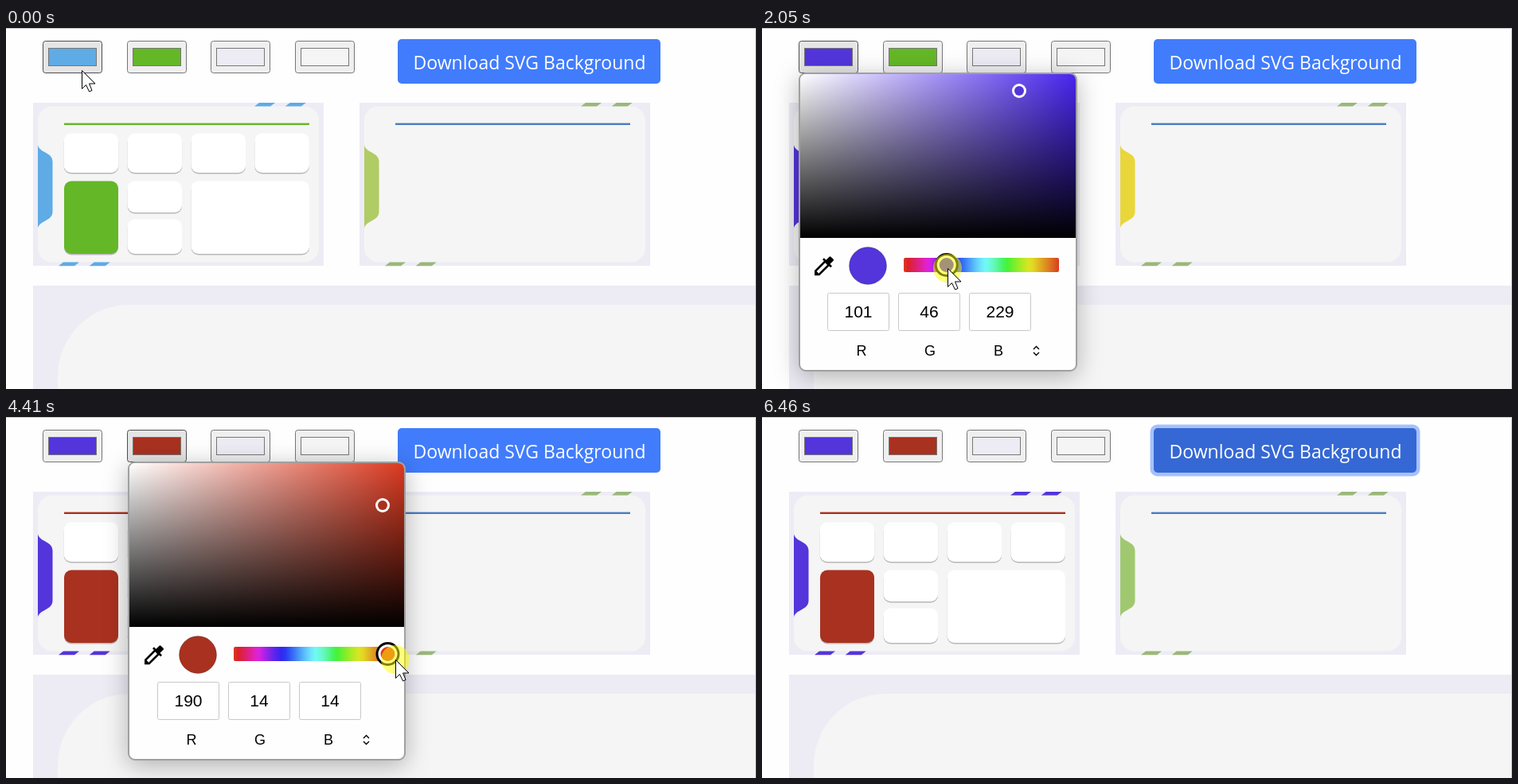
An HTML page for the animation above (6.7 s loop, 942 by 454 pixels).

```html
<!DOCTYPE html>
<html lang="en">
<head>
<meta charset="utf-8">
<style>
  html, body { margin: 0; width: 100%; height: 100%; overflow: hidden; background: #fefefe; }
  svg { display: block; }
  text { text-anchor: middle; font: 21px "Liberation Sans", Arial, sans-serif; }
  .button { font: 23px "Open Sans", "Noto Sans", sans-serif; fill: #fff; }
  .label { font-size: 18px; }
  .popup { filter: drop-shadow(0 6px 15px rgba(0, 0, 0, .28)); }
</style>
</head>
<body>
<svg width="942" height="454" viewBox="0 0 942 454">
  <defs>
    <linearGradient id="dark" x2="0" y2="1">
      <stop stop-opacity="0"/><stop offset="1"/>
    </linearGradient>
    <linearGradient id="hues"></linearGradient>
  </defs>
  <g id="scene"></g>
</svg>
<script>
const LOOP = 6700;
const LILAC = '#edecf5', PAPER = '#f5f5f5';

// A click holds the button from the end of its move, a drag from the start, both until the next move.
const moves = [
  { from: 90, to: 330, x: 107, y: 53, hold: 'click' },
  { from: 760, to: 800, x: 99, y: 106 },
  { from: 800, to: 1420, x: 263, y: 307 },
  { from: 1490, to: 1890, x: 233, y: 302, hold: 'drag' },
  { from: 2060, to: 2450, x: 200, y: 16 },
  { from: 2450, to: 2680, x: 178, y: 54, hold: 'click' },
  { from: 3125, to: 3790, x: 430, y: 291 },
  { from: 3870, to: 4400, x: 489, y: 305, hold: 'drag' },
  { from: 4560, to: 4860, x: 902, y: 174, hold: 'click' },
  { from: 5200, to: 5580, x: 700, y: 48 },
  { from: 5900, to: 6000, x: 700, y: 48, hold: 'drag' },
  { from: 6050, to: 6450, x: 858, y: 470 }
];
const pickers = [
  { dx: 0, open: 330, close: 2760, drag: 1490, end: 1890, hues: [200, 258], s: .799, v: .898, mark: [323, 79] },
  { dx: 107, open: 2920, close: 4860, drag: 3870, end: 4400, hues: [102, 0], s: .926, v: .745, mark: [365, 111] }
];

function ease(t, from, to) {
  const p = Math.min(1, Math.max(0, (t - from) / (to - from)));
  return p * p * (3 - 2 * p);
}
const mix = (a, b, p) => a + (b - a) * p;

const hsv = (h, s, v) => [5, 3, 1].map(n => {
  const k = (n + h / 60) % 6;
  return Math.round(255 * v * (1 - s * Math.max(0, Math.min(k, 4 - k, 1))));
});

// Screen profile: shifts each hue a little, pales the cyans and dims the reds.
function tone(h, s = 1, v = 1) {
  const a = h * Math.PI / 180;
  const sat = .85 - .3 * Math.exp(-(((h - 170) / 45) ** 2));
  return `rgb(${hsv(h + 8 * Math.cos(2 * a), sat * s, (.92 - .06 * Math.cos(a)) * v)})`;
}

function colour(p, t) {
  const hue = mix(...p.hues, ease(t, p.drag, p.end));
  return { hue, swatch: tone(hue, (1 + p.s) / 2, p.v + .025), field: tone(hue), rgb: hsv(hue, p.s, p.v) };
}

function tabColour(t) {
  const warm = .27 + .68 * ease(t, 300, 2500) - .85 * ease(t, 4950, 6460);
  return `rgb(${mix(150, 245, warm)},${mix(199, 216, warm)},${mix(118, 50, warm)})`;
}

document.getElementById('hues').innerHTML = Array.from({ length: 37 }, (_, i) =>
  `<stop offset="${i / 36}" stop-color="${tone(360 - i * 10)}"/>`).join('');

const rect = (x, y, w, h, fill, r = 0, more = '') =>
  `<rect x="${x}" y="${y}" width="${w}" height="${h}" rx="${r}" fill="${fill}" ${more}/>`;
const boxed = (x, y, w, h, fill, r, stroke) =>
  rect(x + .5, y + .5, w - 1, h - 1, fill, r, `stroke="${stroke}"`);
const disc = (x, y, r, fill, more = '') => `<circle cx="${x}" cy="${y}" r="${r}" fill="${fill}" ${more}/>`;
const path = (d, fill, more = '') => `<path d="${d}" fill="${fill}" ${more}/>`;
const text = (x, y, s, cls = '') => `<text x="${x}" y="${y}" class="${cls}">${s}</text>`;

const swatch = (x, fill, hover) =>
  boxed(x, 16, 75, 41, hover ? '#e5e5e5' : '#efefef', 3, hover ? '#4f4f4f' : '#767676') +
  boxed(x + 7, 25, 61, 23, fill, 0, '#777');

function slide(x, tab, stripe) {
  const pair = (dx, y) => [0, 38.7].map(gap => path(`M${x + dx + gap} ${y + 4.6}l6 -4.6h20l-6 4.6z`, stripe)).join('');
  return rect(x, 94, 365, 205, LILAC) + rect(x + 6, 98.5, 353, 196, PAPER, 18) +
    pair(278, 94) + pair(32, 294.6) +
    path(`M${x + 6} 147c1.5 10 18.5 9 18.5 21v63c0 12 -17 11 -18.5 21z`, tab);
}

const card = (x, y, w, h, fill = '#fff') =>
  rect(x, y + 1.4, w, h, '#b8b8b8', 9) + rect(x, y, w, h, fill, 9);

function page(t, a, b) {
  const hover = t >= 5500, focus = t >= 5970;
  return rect(0, 0, 942, 1, '#c8c8c8') + rect(941, 0, 1, 454, '#c8c8c8') +
    swatch(46, a.swatch, t < 2600) + swatch(152, b.swatch, t >= 2600 && t < 4560) +
    swatch(257, LILAC) + swatch(363, PAPER) +
    (focus ? rect(487.5, 9.5, 339, 65, '#a5c1fc', 9) : '') +
    rect(492, 14, 330, 56, hover ? '#3568d4' : '#417cfc', 5) +
    text(657.5, 52, 'Download SVG Background', 'button') +
    slide(34, a.swatch, a.swatch) + rect(73, 119.6, 308, 2.4, b.swatch) +
    [0, 1, 2, 3].map(i => card(72.7 + 79.9 * i, 132.5, 68.5, 49.5)).join('') +
    card(73, 192.5, 68, 91.5, b.swatch) + card(152.5, 192.5, 68.5, 39.5) +
    card(152.5, 240.5, 68.5, 43.5) + card(232.5, 192.5, 148.5, 91.5) +
    slide(444, tabColour(t), '#9ab87a') + rect(489, 119.6, 295, 2.4, '#4a7cc0') +
    rect(34, 324, 907, 130, LILAC) + path('M65 454V438A90 90 0 0 1 155 348H941V454Z', PAPER);
}

const dropper = 'M20.71 5.63l-2.34-2.34a1 1 0 0 0-1.41 0l-3.12 3.12-1.93-1.91-1.41 1.41 1.42 1.42L3 16.25V21h4.75' +
  'l8.92-8.92 1.42 1.42 1.41-1.41-1.92-1.92 3.12-3.12c.4-.4.4-1.02.01-1.42z' +
  'M6.92 19L5 17.08l8.06-8.06 1.92 1.92z';

function picker({ dx, mark, drag }, c, t) {
  const snap = dx ? 1 : 0; // pixel rounding of the shifted popup
  const dragged = t >= drag, thumb = 176.5 + 195 * (1 - c.hue / 360);
  const fields = c.rgb.map((v, i) =>
    boxed(82 + 89 * i, 333, 78, 48, '#fff', 2, '#c8c8c8') + text(121 + 89 * i, 364, v) +
    text(125 + 86 * i, 412, 'RGB'[i], 'label')).join('');
  return `<g transform="translate(${dx})">
    <linearGradient id="tint"><stop stop-color="#fff"/><stop offset="1" stop-color="${c.field}"/></linearGradient>
    <g class="popup">${rect(47, 57, 348 - snap, 374, '#fefefe', 8, 'stroke="#a0a0a0" stroke-width="2"')}</g>
    ${['tint', 'dark'].map(id => path(`M48 264V65a7 7 0 0 1 7 -7H${387 - snap}a7 7 0 0 1 7 7V264Z`, `url(#${id})`)).join('')}
    <g transform="translate(${snap})">
      ${dragged ? '' : disc(...mark, 12, '#000')}
      ${disc(...mark, 9, '#fff') + disc(...mark, 6, c.swatch)}
      ${path(dropper, '#000', 'transform="translate(62 283.3) scale(1.333)"')}
      ${disc(133, 299, 23.5, c.swatch, 'stroke="#000" stroke-opacity=".22"')}
      ${rect(178, 289, 195, 18, 'url(#hues)', 2)}
      ${dragged ? disc(thumb, 298, 15, '#000') : disc(thumb, 298.5, 13, '#000', 'opacity=".15"')}
      ${disc(thumb, 298, 12, '#fff') + disc(thumb, 298, 9, c.field)}
      ${fields}
      ${path('M341 404l3.5 -3.5 3.5 3.5M341 408l3.5 3.5 3.5 -3.5', 'none', 'stroke="#000" stroke-width="1.4"')}
    </g></g>`;
}

function cursor(t) {
  let x = 95, y = 53, held = false;
  for (const m of moves) {
    if (t < m.from) break;
    const p = ease(t, m.from, m.to);
    x = mix(x, m.x, p);
    y = mix(y, m.y, p);
    held = m.hold === 'drag' || (m.hold === 'click' && t >= m.to);
  }
  return (held ? disc(x, y, 18, '#ff0', 'opacity=".5"') : '') +
    path('M.5 .5V23.5L5.5 18.5L9.5 27L13 25.5L9.5 17H17Z', '#fff',
      `stroke="#000" transform="translate(${x} ${y})"`);
}

function scene(t) {
  const colours = pickers.map(p => colour(p, t));
  const popups = pickers.map((p, i) => t >= p.open && t < p.close ? picker(p, colours[i], t) : '');
  return page(t, ...colours) + popups.join('') + cursor(t);
}

const root = document.getElementById('scene');
const begin = performance.now();
function frame() {
  root.innerHTML = scene((performance.now() - begin) % LOOP);
  requestAnimationFrame(frame);
}
frame();
</script>
</body>
</html>
```
